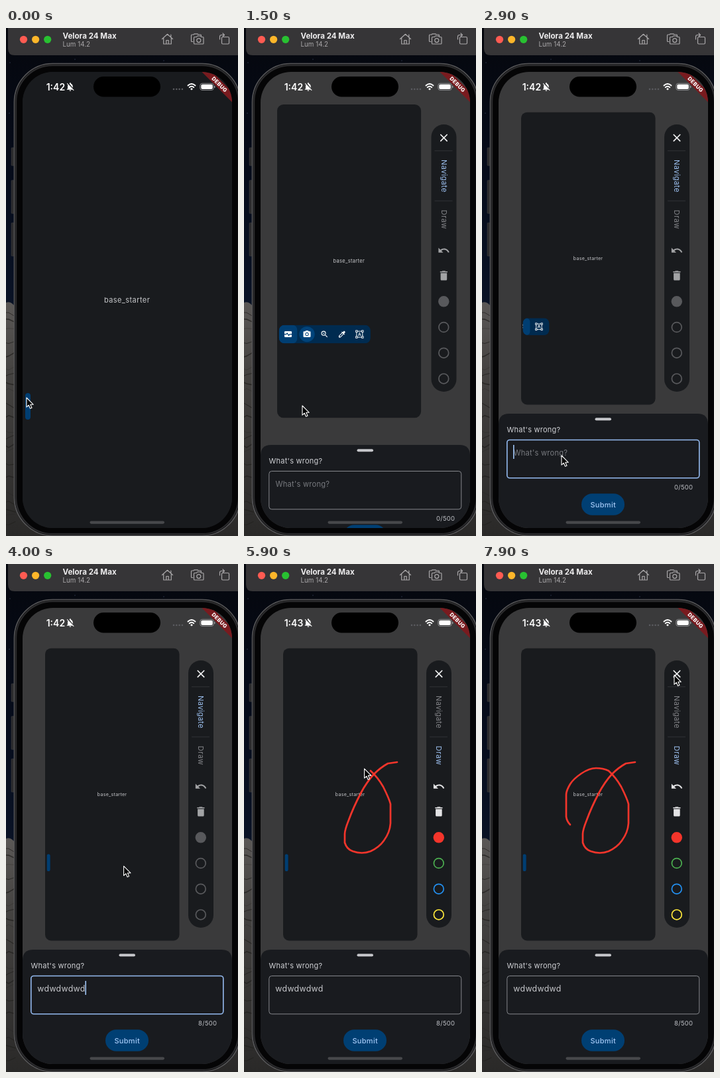
Recreate the animation shown at these times as an HTML page. Size 350 by 764 pixels, loop 8000 ms.

```html
<!DOCTYPE html>
<html lang="en">
<head>
<meta charset="utf-8">
<title>Feedback panel</title>
<style>
  html, body { margin: 0; height: 100%; overflow: hidden; background: #000; }
  svg.stage { display: block; width: 100vw; height: 100vh; }
  text { font-family: Inter, Roboto, sans-serif; }
  .mid { text-anchor: middle; }
  .line { fill: none; stroke-linecap: round; stroke-linejoin: round; }
</style>
</head>
<body>
<svg class="stage" viewBox="0 0 350 764">
  <defs>
    <linearGradient id="sky" x2="0" y2="1">
      <stop offset="0" stop-color="#05070d"/><stop offset=".3" stop-color="#060c1b"/>
      <stop offset=".55" stop-color="#0a1326"/>
    </linearGradient>
    <linearGradient id="rock" x2="0" y2="1">
      <stop offset="0" stop-color="#5b5856"/><stop offset=".3" stop-color="#454341"/>
      <stop offset="1" stop-color="#2a2928"/>
    </linearGradient>
    <clipPath id="screen"><rect x="25" y="66" width="316" height="686" rx="46"/></clipPath>
    <clipPath id="panelClip"><rect id="panelShape" height="40"/></clipPath>
    <path id="camera" d="M12 8.8a3.2 3.2 0 100 6.4 3.2 3.2 0 000-6.4zM9 2L7.17 4H4c-1.1 0-2 .9-2 2v12c0 1.1.9 2 2 2h16c1.1 0 2-.9 2-2V6c0-1.1-.9-2-2-2h-3.17L15 2H9zm3 15c-2.76 0-5-2.24-5-5s2.24-5 5-5 5 2.24 5 5-2.24 5-5 5z"/>
    <path id="zoom" d="M15.5 14h-.79l-.28-.27A6.47 6.47 0 0016 9.5 6.5 6.5 0 109.5 16c1.61 0 3.09-.59 4.23-1.57l.27.28v.79l5 4.99L20.49 19l-4.99-5zm-6 0C7.01 14 5 11.99 5 9.5S7.01 5 9.5 5 14 7.01 14 9.5 11.99 14 9.5 14zM12 10h-2v2H9v-2H7V9h2V7h1v2h2v1z"/>
    <path id="picker" d="M20.71 5.63l-2.34-2.34c-.39-.39-1.02-.39-1.41 0l-3.12 3.12-1.93-1.91-1.41 1.41 1.42 1.42L3 16.25V21h4.75l8.92-8.92 1.42 1.42 1.41-1.41-1.92-1.92 3.12-3.12c.4-.4.4-1.03.01-1.42zM6.92 19L5 17.08l8.06-8.06 1.92 1.92L6.92 19z"/>
    <path id="bin" d="M6 19c0 1.1.9 2 2 2h8c1.1 0 2-.9 2-2V7H6v12zM19 4h-3.5l-1-1h-5l-1 1H5v2h14V4z"/>
    <path id="back" d="M12.5 8c-2.65 0-5.05.99-6.9 2.6L2 7v9h9l-3.62-3.62c1.39-1.16 3.16-1.88 5.12-1.88 3.54 0 6.55 2.31 7.6 5.5l2.37-.78C21.08 11.03 17.15 8 12.5 8z"/>
    <path id="mute" d="M20 18.69L7.84 6.14 5.27 3.49 4 4.76l2.8 2.8v.01c-.52.99-.8 2.16-.8 3.42v5l-2 2v1h13.73l2 2L21 19.72l-1-1.03zM12 22c1.11 0 2-.89 2-2h-4c0 1.11.89 2 2 2zm6-7.32V11c0-3.08-1.64-5.64-4.5-6.32V4c0-.83-.67-1.5-1.5-1.5s-1.5.67-1.5 1.5v.68c-.15.03-.29.08-.42.12l7.92 9.88z"/>
  </defs>

  <!-- desktop -->
  <rect width="350" height="764" fill="url(#sky)"/>
  <path d="M0 413Q8 410 14 420L40 640H350V764H0Z" fill="url(#rock)"/>
  <g id="cracks" class="line" stroke="#23211f" stroke-opacity=".75"/>
  <g fill="#53627f"><circle cx="6" cy="52" r=".6"/><circle cx="104" cy="47" r=".6"/><circle cx="238" cy="49" r=".6"/><circle cx="5" cy="128" r=".6"/></g>

  <!-- simulator title bar -->
  <path d="M3 0H350V41H13Q3 41 3 31Z" fill="#363537"/>
  <circle cx="26.5" cy="17.3" r="5.6" fill="#ff5b52"/>
  <circle cx="44.6" cy="17.3" r="5.6" fill="#fdb62a"/>
  <circle cx="62.7" cy="17.3" r="5.6" fill="#28c131"/>
  <text x="85.5" y="15.6" font-size="11.6" font-weight="700" fill="#eeedee">Velora 24 Max</text>
  <text x="85.5" y="28.4" font-size="9.8" fill="#aaa8aa">Lum 14.2</text>
  <g class="line" stroke="#a9a7a9" stroke-width="1.2">
    <path d="M235.5 16.5L243.5 9.3L251.5 16.5M237.7 15V24H249.3V15M248.8 13.5V10M241.8 24V18.5H245.2V24"/>
    <path d="M282 20.5H280.5Q279.5 20.5 279.5 19.5V11Q279.5 10 280.5 10H283L284 8.8H289L290 10H293.5Q294.5 10 294.5 11V12"/>
    <path d="M284.5 13.5H287.5L288.5 12H293.5L294.5 13.5H297Q298 13.5 298 14.5V23Q298 24 297 24H284.5Q283.5 24 283.5 23V14.5Q283.5 13.5 284.5 13.5Z"/>
    <circle cx="290.8" cy="18.6" r="3"/>
    <rect x="325.5" y="13.5" width="11" height="10.5" rx="1.5"/>
    <path d="M322.5 17V13Q322.5 10.5 325 10.5H329M327 8L329.5 10.5L327 13"/>
  </g>

  <!-- phone body -->
  <g fill="#2b2b2d" stroke="#3c3c3e" stroke-width=".6">
    <rect x="8" y="180" width="6" height="27" rx="1"/><rect x="8" y="229" width="6" height="50" rx="1"/><rect x="8" y="293" width="6" height="50" rx="1"/>
  </g>
  <rect x="12.5" y="53.5" width="341" height="710" rx="58" fill="#050506" stroke="#59595b" stroke-width="1.6"/>
  <rect x="15" y="56" width="336" height="705" rx="55.5" fill="none" stroke="#2a2a2c" stroke-width="2.4"/>

  <g clip-path="url(#screen)">
    <rect id="base" x="25" y="66" width="316" height="686"/>

    <g id="shot">
      <rect width="316" height="686" rx="14" fill="#191b1e"/>
      <text class="mid" x="157.6" y="346.5" font-size="11" letter-spacing=".42" fill="#c6c7ca">base_starter</text>
      <g transform="translate(4 483)">
        <g clip-path="url(#panelClip)">
          <rect width="202" height="40" fill="#002b50"/>
          <g id="tools" fill="#fff">
            <circle id="tap" cx="21.5" cy="20" r="17" fill="#00437a"/>
            <use href="#camera" transform="translate(11.9 10.4) scale(.8)"/>
            <use href="#zoom" transform="translate(50.4 10.4) scale(.8)"/>
            <use href="#picker" transform="translate(88.9 10.4) scale(.8)"/>
            <g transform="translate(137 20)">
              <rect x="-6.5" y="-6.5" width="13" height="13" fill="none" stroke="#fff" stroke-width="1.4"/>
              <g fill="#002b50" stroke="#fff" stroke-width="1.3">
                <rect x="-8.3" y="-8.3" width="3.6" height="3.6"/><rect x="4.7" y="-8.3" width="3.6" height="3.6"/>
                <rect x="-8.3" y="4.7" width="3.6" height="3.6"/><rect x="4.7" y="4.7" width="3.6" height="3.6"/>
              </g>
              <text class="mid" y="3.4" font-size="9.5" font-weight="600">A</text>
            </g>
          </g>
          <rect id="tile" height="40" fill="#003e72"/>
          <g id="pulse">
            <rect x="-8" y="-6.5" width="16" height="13" rx="1.8" fill="#fff"/>
            <path class="line" d="M-8 0H-4L-2 -2.5L1.5 2.8L3.5 0H8" stroke="#003e72" stroke-width="1.7"/>
          </g>
        </g>
      </g>
    </g>

    <path id="ink" class="line" stroke="#f4352b" stroke-width="2.7" d="M231 298L217 300Q206 306 196 316Q185 328 176 345Q165 366 158 385Q152 400 152 406V419Q155 429 164 432Q178 437 191 432Q204 426 211 416Q220 404 221 390L221 361Q219 353 210 335Q202 321 191 311Q183 307 172 307Q162 307 150 315Q138 323 133 331Q127 341 127 347V380Q128 387 133 392"/>

    <g id="bar">
      <rect x="275" y="145" width="38" height="402" rx="19" fill="#191b1e"/>
      <rect id="flash" x="279" y="260" width="29" height="55" rx="2" fill="#3d3f43"/>
      <path d="M280 184.7H307M280 260H307" stroke="#303236"/>
      <path class="line" d="M289.3 160.5L298.7 169.9M298.7 160.5L289.3 169.9" stroke="#f2f2f3" stroke-width="1.7"/>
      <g class="mid" font-size="11" letter-spacing=".4">
        <text id="nav" transform="translate(290 222.7) rotate(90)">Navigate</text>
        <text id="draw" transform="translate(290 288) rotate(90)">Draw</text>
      </g>
      <g id="edit">
        <use href="#back" transform="translate(284.3 325) scale(.8)"/>
        <use href="#bin" transform="translate(284.3 362.8) scale(.8)"/>
      </g>
      <g id="dots" stroke-width="1.7"></g>
    </g>

    <g id="sheet">
      <path d="M25 780V596Q25 580 41 580H325Q341 580 341 596V780Z" fill="#191b1f"/>
      <rect x="170.5" y="586.3" width="24.5" height="4" rx="2" fill="#c5c6ca"/>
      <text x="37.5" y="608.3" font-size="11" letter-spacing=".25" fill="#cfd0d4">What's wrong?</text>
      <rect id="field" x="37.8" y="619.5" width="290" height="57.3" rx="4" fill="none"/>
      <text id="hint" x="47.5" y="643" font-size="11.2" letter-spacing=".2" fill="#77797e">What's wrong?</text>
      <text id="value" x="47.3" y="643" font-size="12.4" letter-spacing=".3" fill="#c6c7cb"></text>
      <rect id="caret" y="627" width="1.6" height="21" fill="#9fc5f5"/>
      <text id="count" x="318.3" y="693.5" font-size="9.5" letter-spacing=".25" text-anchor="end" fill="#bfc1c6"></text>
      <rect x="150" y="700.3" width="65" height="32.5" rx="16.25" fill="#003f73"/>
      <text class="mid" x="182.7" y="720.5" font-size="11" font-weight="500" letter-spacing=".3" fill="#a3c8f5">Submit</text>
    </g>

    <!-- status bar -->
    <rect x="132" y="73" width="101" height="30.5" rx="15.25" fill="#000"/>
    <text id="clock" x="60.7" y="93.5" font-size="14" font-weight="600" fill="#fff"></text>
    <use href="#mute" transform="translate(89.2 80.7) scale(.64)" fill="#fff"/>
    <g fill="#5b5c60"><circle cx="253" cy="92" r="1.3"/><circle cx="257.3" cy="92" r="1.3"/><circle cx="261.6" cy="92" r="1.3"/><circle cx="265.9" cy="92" r="1.3"/></g>
    <g class="line" stroke="#fff" stroke-width="1.9">
      <path d="M274.5 86.5Q280 81.5 285.5 86.5M276.7 89.2Q280 86.3 283.3 89.2"/>
      <circle cx="280" cy="91.8" r=".6"/>
    </g>
    <rect x="292.8" y="83.3" width="20.5" height="10.2" rx="3.2" fill="none" stroke="#8a8b8e"/>
    <rect x="294.3" y="84.8" width="17.5" height="7.2" rx="2" fill="#fff"/>
    <path d="M314.8 87V90" stroke="#8a8b8e" stroke-width="1.4"/>
    <g transform="translate(341 66) rotate(45)">
      <rect x="-34" y="21.2" width="68" height="11" fill="#791b1f"/>
      <text class="mid" y="29.5" font-size="8" font-weight="800" letter-spacing=".3" fill="#fff">DEBUG</text>
    </g>
    <rect x="126.5" y="741.5" width="112.5" height="4.2" rx="2.1" fill="#47484b"/>
  </g>

  <path id="cursor" d="M0 0V14.2L3.3 11.2L5.5 16.3L8 15.2L5.8 10.3H10.3Z" fill="#000" stroke="#fff" stroke-width="1.1" stroke-linejoin="round"/>
</svg>
<script>
const $ = id => document.getElementById(id);
const set = (id, attrs) => { for (const k in attrs) $(id).setAttribute(k, attrs[k]); };
const smooth = p => p * p * (3 - 2 * p);

// Values of a keyed track [time, ...values] at time t.
function at(track, t, ease = p => p) {
  if (t <= track[0][0]) return track[0].slice(1);
  const i = track.findIndex(k => k[0] > t);
  if (i < 0) return track[track.length - 1].slice(1);
  const a = track[i - 1], b = track[i];
  const p = ease((t - a[0]) / (b[0] - a[0]));
  return a.slice(1).map((v, j) => v + (b[j + 1] - v) * p);
}

const LOOP = 8000, STEP = 100;
const PANEL = [[0, 0], [100, .15], [300, .7], [500, 1], [2600, 1], [2900, .28], [3100, 0]];
// shot x, y, scale; toolbar and sheet offsets
const OPEN = [[1300, 25, 66, 1, 70, 172], [1400, 36, 88, .86, 36, 115], [1500, 50, 115, .687, 7.5, 47],
  [1600, 55, 121, .661, 3, 19], [1700, 57.5, 125, .648, 1, 6], [1900, 59, 126.7, .641, 0, 0]];
const MOUSE = [[700, 31, 556], [1100, 88, 568], [1800, 88, 568], [2200, 124, 609], [2300, 123, 609],
  [2400, 123, 609], [2700, 120, 643], [3600, 120, 643], [4300, 215, 332], [4700, 289, 290], [4800, 289, 290],
  [5000, 261, 291], [5200, 231, 298]];
const LEAVE = [[6600, 133, 392], [7100, 190, 350], [7200, 190, 350], [7900, 290, 167]];
const PEN = [[5200, 0], [5500, .32], [5900, .745], [6100, .865], [6500, 1]];
const COLORS = ['#f4352b', '#4caf50', '#2390f0', '#ffe93b'];

const inkLength = $('ink').getTotalLength();
const dots = COLORS.map((c, i) => {
  const dot = document.createElementNS('http://www.w3.org/2000/svg', 'circle');
  dot.setAttribute('cx', 293.8);
  dot.setAttribute('cy', 411.3 + i * 38.7);
  dot.setAttribute('r', 7.4);
  return $('dots').appendChild(dot);
});

let cracks = '';
for (let i = 0; i < 22; i++) {
  const y = 428 + i * 15.5 + 7 * Math.sin(i * 5.3);
  const width = 1 + .7 * Math.sin(i * 2.1);
  cracks += `<path stroke-width="${width}" d="M-1 ${y}l5 ${3 * Math.sin(i * 3)}l10 ${6 * Math.cos(i * 7)}"/>`;
}
$('cracks').innerHTML = cracks;

function drawPanel(t) {
  const [p] = at(PANEL, t);
  const tile = 8 + 32 * p, width = tile + 161 * p;
  set('panelShape', { width, rx: Math.min(12, width / 2) });
  set('tile', { width: tile, rx: Math.min(10, tile / 2) });
  set('tools', { transform: `translate(${width - 161})` });
  set('pulse', { transform: `translate(${tile / 2} 20)`, opacity: Math.max(0, (p - .4) / .6) });
  set('tap', { opacity: at([[1300, 0], [1400, 1], [1600, 1], [1900, 0]], t)[0] });
}

function drawEditor(t, drawing) {
  const open = t >= 1400;
  const [x, y, s, barX, sheetY] = at(OPEN, t);
  set('base', { fill: open ? '#3a3a3b' : '#191b1e' });
  set('shot', { transform: `translate(${x} ${y}) scale(${s})` });
  set('bar', { transform: `translate(${barX})`, visibility: open ? 'visible' : 'hidden' });
  set('sheet', { transform: `translate(0 ${sheetY})`, visibility: open ? 'visible' : 'hidden' });

  set('nav', { fill: drawing ? '#85868a' : '#9fc3f3' });
  set('draw', { fill: drawing ? '#9fc3f3' : '#85868a' });
  set('edit', { fill: drawing ? '#e3e3e5' : '#a2a3a5' });
  set('flash', { opacity: at([[4700, 0], [4800, 1], [5000, 1], [5200, 0]], t)[0] });
  dots.forEach((dot, i) => {
    const color = drawing ? COLORS[i] : '#58595c';
    dot.setAttribute('stroke', color);
    dot.setAttribute('fill', i ? 'none' : color);
  });
}

function drawField(t, drawing) {
  const focus = t >= 2700 && !drawing;
  const typed = t < 3100 ? 0 : Math.min(8, 2 + 2 * Math.floor((t - 3100) / 200));
  set('field', { stroke: focus ? '#94baf0' : '#85878c', 'stroke-width': focus ? 1.6 : 1 });
  $('value').textContent = 'wd'.repeat(typed / 2);
  $('count').textContent = typed + '/500';
  set('hint', { opacity: typed ? 0 : 1 });
  const blink = t < 4200 || t >= 4700;
  set('caret', {
    x: 47 + (typed ? $('value').getComputedTextLength() : 0),
    opacity: focus && blink ? 1 : 0
  });
}

function drawPointer(t) {
  const [pen] = at(PEN, t);
  const shown = inkLength * (t >= 6500 ? 1 : Math.max(0, pen - .022));
  set('ink', {
    'stroke-dasharray': `${shown} ${inkLength + 9}`,
    visibility: shown ? 'visible' : 'hidden'
  });
  let pos;
  if (t <= 5200) pos = at(MOUSE, t, smooth);
  else if (t >= 6600) pos = at(LEAVE, t, smooth);
  else {
    const p = $('ink').getPointAtLength(pen * inkLength);
    pos = [p.x, p.y];
  }
  set('cursor', { transform: `translate(${pos})` });
}

const start = performance.now();
function frame() {
  const t = Math.floor((performance.now() - start) % LOOP / STEP) * STEP;
  const drawing = t >= 4800;
  drawPanel(t);
  drawEditor(t, drawing);
  drawField(t, drawing);
  drawPointer(t);
  $('clock').textContent = t < 4600 ? '1:42' : '1:43';
  requestAnimationFrame(frame);
}
frame();
</script>
</body>
</html>
```
